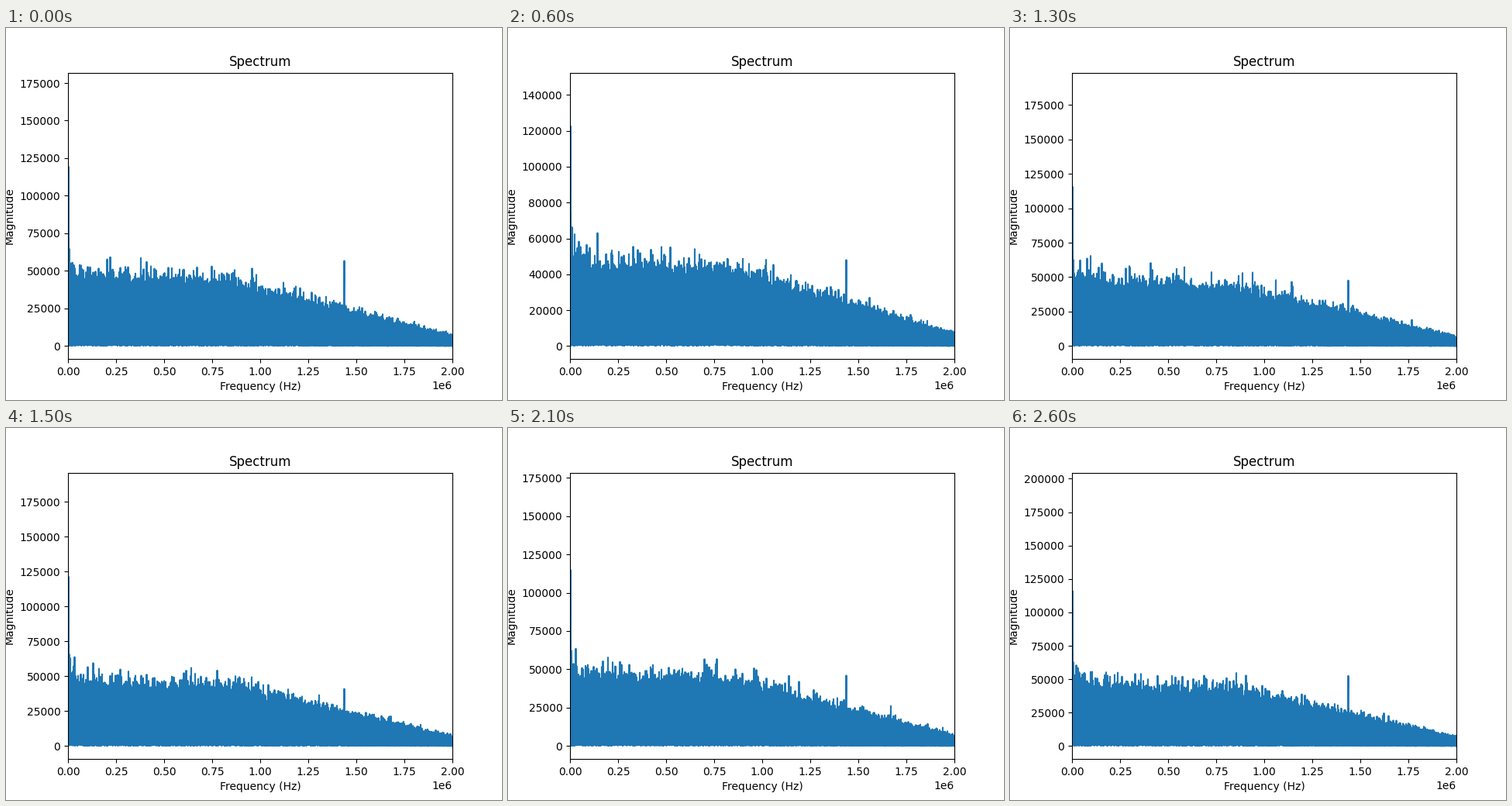
A matplotlib script that plays this animation: 640x480 px, repeating every 2700 ms.

```python
import numpy as np
import matplotlib.pyplot as plt
from matplotlib.animation import FuncAnimation

FRAMES, INTERVAL = 27, 100
BINS = 992          # two bins per pixel of axes width
DRAWS = 400         # noise samples behind each bin
CARRIER = 1.4375    # MHz

mhz = np.linspace(0, 2, BINS + 1)

# Nearly flat noise floor, then a linear roll-off, with a small rise at DC
floor = np.minimum(46.5 - 4.8 * mhz, 38 - 31 * (mhz - 1)) + 8 * np.exp(-mhz / 0.04)
sigma = floor * 1000 / 3.72

# Key points of the two steady peaks over time, in thousands
KEYS = [0, 6, 10, 15, 18, 21, 26]
DC = [173.25, 145.2, 192.3, 186.7, 167.6, 169.8, 194.8]
TONE = [56.7, 48, 57.5, 41, 44, 46, 52.5]


def spectrum(i):
    """Lowest and highest magnitude in every bin."""
    rng = np.random.default_rng(500 + i)
    # Extremes of DRAWS Rayleigh samples
    u, v = rng.random((2, BINS + 1))
    high = sigma * np.sqrt(-2 * np.log(1 - u ** (1 / DRAWS)))
    low = sigma * np.sqrt(-2 * np.log(v) / DRAWS)

    high[0] = 1000 * np.interp(i, KEYS, DC)
    high[1:4] = np.array([118e3, 71e3, 64e3]) * rng.uniform(0.95, 1.05)
    high[round(CARRIER * BINS / 2)] = 1000 * np.interp(i, KEYS, TONE)
    return low, high


fig, ax = plt.subplots(figsize=(6.4, 4.8), dpi=100)
line, = ax.plot([], [], color="#1f77b4", lw=1.5)
ax.set_title("Spectrum")
ax.set_xlabel("Frequency (Hz)")
ax.set_ylabel("Magnitude")
ax.set_xlim(0, 2e6)


def update(i):
    low, high = spectrum(i)
    line.set_data(np.repeat(mhz * 1e6, 2), np.column_stack([high, low]).ravel())
    top = high.max()
    ax.set_ylim(-0.05 * top, 1.05 * top)
    return line,


anim = FuncAnimation(fig, update, frames=FRAMES, interval=INTERVAL,
                     init_func=lambda: update(0), repeat=True, repeat_delay=0)
plt.show()
```
